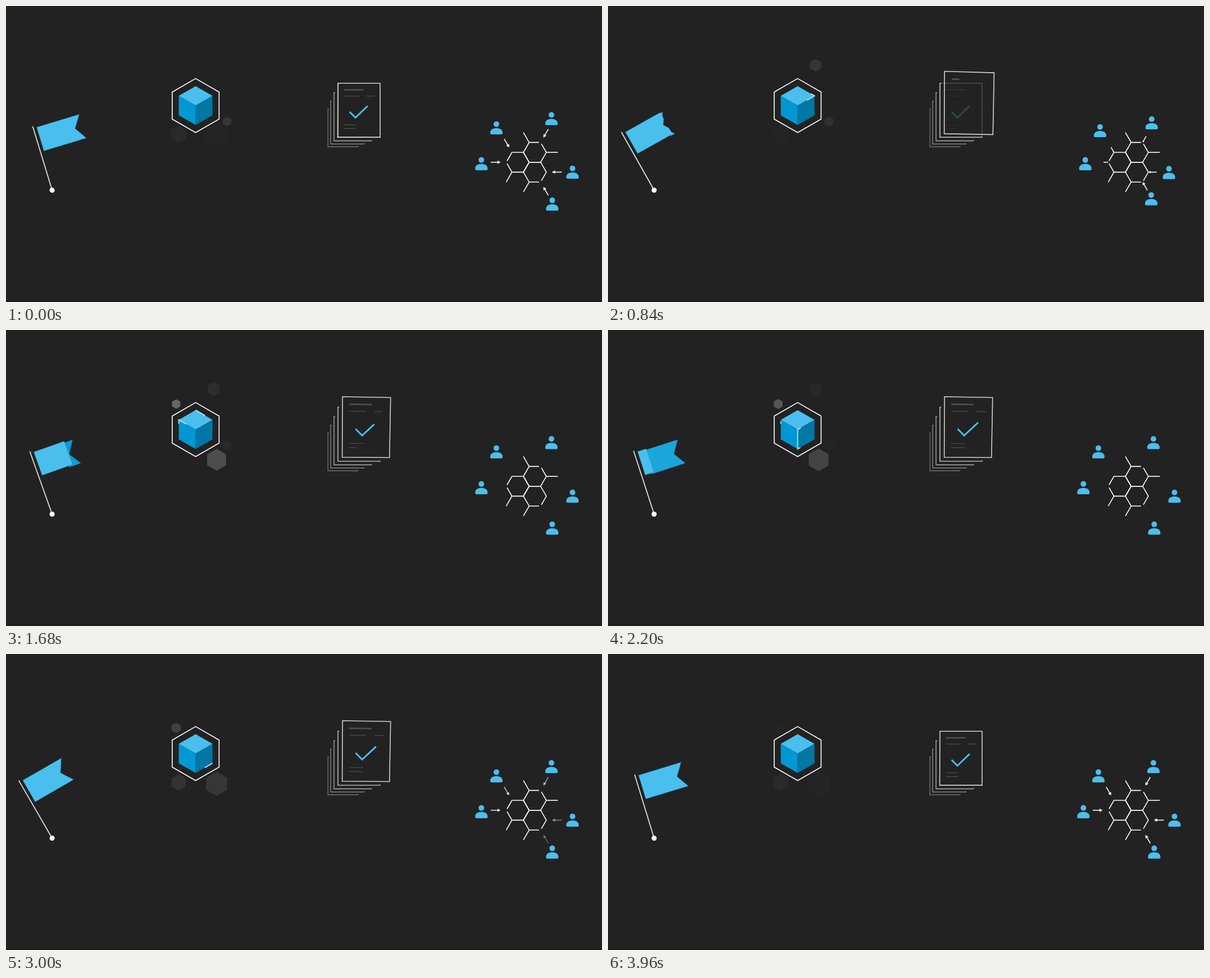
An HTML page with a canvas for the animation above (4 s loop, 1061x528 px).

```html
<!DOCTYPE html>
<html>
<head>
<meta charset="utf-8">
<style>
html, body { margin: 0; width: 100%; height: 100%; overflow: hidden; background: #222; }
canvas { display: block; }
</style>
</head>
<body>
<canvas id="stage" width="1061" height="528"></canvas>
<script>
const ctx = document.getElementById('stage').getContext('2d');
const LOOP = 4000, BLUE = '#4abfee', SIXTH = Math.PI / 3;

const clamp = x => Math.max(0, Math.min(1, x));
const ramp = (t, start, length) => clamp((t - start) / length);
const lerp = (a, b, k) => a + (b - a) * k;
const mix = (p, q, k) => p.map((v, i) => lerp(v, q[i], k));
const ease = k => (1 - Math.cos(Math.PI * k)) / 2;
const easeOut = k => 1 - (1 - k) ** 2;
const polar = ([x, y], r, angle) => [x + r * Math.cos(angle), y + r * Math.sin(angle)];

function trace(points, close) {
  ctx.beginPath();
  points.forEach(p => ctx.lineTo(...p));
  if (close) ctx.closePath();
}
function line(points, color, width, close) {
  trace(points, close);
  ctx.strokeStyle = color;
  ctx.lineWidth = width;
  ctx.stroke();
}
function fill(points, color) {
  trace(points, true);
  ctx.fillStyle = color;
  ctx.fill();
}
function disc(x, y, r, color) {
  ctx.beginPath();
  ctx.arc(x, y, r, 0, 7);
  ctx.fillStyle = color;
  ctx.fill();
}
const hexagon = (center, r) => [...Array(6).keys()].map(i => polar(center, r, (i - 1.5) * SIXTH));

// The stretch of a polyline between two distances counted in segments
function stretch(path, from, to) {
  const last = path.length - 1;
  const at = d => {
    const n = Math.min(last - 1, Math.floor(d));
    return mix(path[n], path[n + 1], d - n);
  };
  return [at(from), ...path.filter((p, n) => n > from && n < to), at(to)];
}

// Flag: swings on its base while a fold travels along the cloth
const CLOTH = [[6.3, -115.5], [85.5, -115.5], [71.2, -93.3], [85.5, -71.2], [6.3, -71.2]];

function clothPart(from, to, color) {
  ctx.save();
  ctx.beginPath();
  ctx.rect(from, -120, to - from, 60);
  ctx.clip();
  fill(CLOTH, color);
  line(CLOTH, 'rgba(0,100,150,.4)', 0.8, true);
  ctx.restore();
}
function drawFlag(t) {
  const p = t % 1000 / 1000, k = t < 1000 || t >= 2000 && t < 3000 ? p : 1 - p;
  const swing = 16.9 + 13.1 * (k - 0.13 * Math.sin(2 * Math.PI * k));
  const edge = 5 + 86 * p, lift = Math.sin(Math.PI * p);
  const shade = clamp(Math.min(p / 0.27, (0.88 - p) / 0.19));
  ctx.save();
  ctx.translate(82.1, 328.5);
  ctx.rotate(-swing * Math.PI / 180);
  line([[0, 0], [0, -118.8]], '#ddd', 1.8);
  disc(0, 0, 4.6, '#fff');
  ctx.save();
  ctx.translate(-8 * lift, 3 * lift);
  clothPart(edge, 100, `rgb(${mix([74, 191, 238], [8, 157, 213], shade)})`);
  ctx.restore();
  clothPart(0, edge, BLUE);
  ctx.restore();
}

// Cube with glints running along its edges, among swelling and fading hexagons
const CENTER = [337.6, 177.6];
const [TOP, RIGHT, LOW_RIGHT, BOTTOM, LOW_LEFT, LEFT] = hexagon(CENTER, 34.7);
const PUFFS = [ // x, y, radius, opacity, start
  [393.5, 206, 8.5, 0.1, 0], [369.5, 105.5, 11, 0.1, 450], [303, 132, 8.4, 0.34, 1450],
  [375, 231.5, 19.2, 0.21, 1500], [307.5, 229, 13.8, 0.1, 2400]
];

function drawGlint(path, reach, age) {
  const head = reach * ease(ramp(age, 0, 1150));
  const tail = reach * easeOut(ramp(age, 280, 2000));
  if (head > tail) line(stretch(path, tail, head), 'rgba(200,238,253,.85)', 2);
}
function drawCube(t) {
  for (const [x, y, r, opacity, start] of PUFFS) {
    const p = (t - start + LOOP) % LOOP / 2600;
    if (p < 1) fill(hexagon([x, y], r * (1 + 0.22 * p)), `rgba(255,255,255,${opacity * (1 - p)})`);
  }
  const frame = hexagon(CENTER, 48.2);
  fill(frame, '#222');
  line(frame, '#fff', 1.6, true);
  fill([TOP, RIGHT, CENTER, LEFT], BLUE);
  fill([LEFT, CENTER, BOTTOM, LOW_LEFT], '#0098d3');
  fill([CENTER, RIGHT, LOW_RIGHT, BOTTOM], '#0077a5');
  drawGlint([TOP, RIGHT, CENTER, LEFT, LOW_LEFT], 3.2, t - 300);
  drawGlint([TOP, RIGHT, CENTER, BOTTOM, LOW_RIGHT], 4, t - 1400);
}

// Documents: a stack in perspective, placed by depth
const pageBox = n => ({
  left: 599 - 8.6 * n + 0.53 * n * n,
  top: 119 + 19.6 * n - 0.88 * n * n,
  right: 683.7 - 18.9 * n + 1.15 * n * n,
  bottom: 227 + 7.5 * n - 0.37 * n * n
});
const ROWS = [ // from, to, height in page units, in drawing order
  [0.145, 0.61, 0.122], [0.145, 0.495, 0.237], [0.145, 0.435, 0.77],
  [0.67, 0.865, 0.237], [0.145, 0.435, 0.838]
];
const CHECK = [[0.279, 0.53], [0.416, 0.638], [0.705, 0.42]];

function drawPage(depth, bend, t) {
  const { left, top, right, bottom } = pageBox(depth), skew = 1 - depth;
  const tl = [left + 22 * bend, top - 7 * bend], bl = [left - 0.4, bottom];
  const tr = [right + skew + 11.5 * bend, top + 1.5 * skew - 4.4 * bend];
  const br = [right - skew - 2 * bend, bottom + 0.5 * skew];
  const at = ([u, v]) => {
    const [x, y] = mix(mix(tl, bl, v), mix(tr, br, v), u);
    return [x - 12 * bend * v * (1 - v), y];
  };
  const steps = [...Array(11).keys()].map(i => i / 10);
  line([...steps.map(v => at([1, v])), ...steps.map(v => at([0, 1 - v]))], '#d0d0d0', 1.6, true);
  ROWS.forEach(([from, to, v], i) => {
    const k = ramp(t, 640 + 180 * i, 600);
    line([at([from, v]), at([lerp(from, to, k), v])], '#505050', i ? 1.2 : 2.6);
  });
  const drawn = 2 * ramp(t, 1120, 600);
  if (drawn) line(stretch(CHECK.map(at), 0, drawn), BLUE, 3);
}
function drawSheetEdge(i, shift, bend) {
  const depth = i + shift, { left, top, right, bottom } = pageBox(depth);
  const sway = bend / 2 ** (i * i);
  const x = left + 22 * sway, y = top - 10 * sway;
  const tick = 2 + 12 * sway;
  ctx.globalAlpha = 0.95 * 0.82 ** depth * Math.min(1, 5 - depth);
  ctx.beginPath();
  ctx.moveTo(x + tick, y);
  ctx.lineTo(x, y);
  ctx.quadraticCurveTo((x + left) / 2 - 6 * sway, (y + bottom) / 2, left, bottom);
  ctx.lineTo(right, bottom);
  ctx.lineTo(right, bottom - 1.5);
  ctx.strokeStyle = '#fff';
  ctx.lineWidth = 1.5 - i * 0.1;
  ctx.stroke();
}
function drawDocuments(t) {
  const q = ramp(t, 3040, 640), shift = ease(q), bend = Math.sin(Math.PI * q);
  for (let i = 1; i < 5; i++) drawSheetEdge(i, shift, bend);
  ctx.globalAlpha = 1 - ramp(t, 360, 640);
  drawPage(1, 0, LOOP);
  // the next page drops in from near the viewer
  const near = (1 - ramp(t, 360, 700)) ** 3;
  ctx.save();
  ctx.globalAlpha = ramp(t, 360, 240);
  ctx.translate(599, 200);
  ctx.transform(1 + near, 0.4 * near, 0, 1 + near, 0, 0);
  ctx.translate(-599, -200);
  drawPage(shift, bend, t);
  ctx.restore();
  ctx.globalAlpha = 1;
}

// Network: three cells around a hub, with people joining in from outside
const HUB = [931.3, 278.7], CELL = 20.4;
const corner = (cell, turn, r = CELL) => polar(polar(HUB, CELL, cell * SIXTH), r, turn * SIXTH);
const PEOPLE = [ // head x, y, cell and corner to join, in sixths of a turn
  [846.3, 274.6, 3, 3], [873, 210.8, 3, 4], [971, 194.3, 5, 5],
  [1008.5, 289.8, 1, 0], [972.4, 346.6, 1, 1]
];

function drawNet() {
  for (const cell of [1, 3, 5]) {
    // each cell is open at its outer corner
    const ring = [0, 1, 2, 3, 4, 5, 6].map(i => corner(cell, cell + i));
    line(stretch(ring, 0.14, 5.86), '#fff', 1.6);
  }
  for (const [cell, turn] of [[5, 4], [5, 6], [3, 2], [1, 2]])
    line([corner(cell, turn), corner(cell, turn, 2 * CELL)], '#fff', 1.6);
}
function drawPerson(x, y) {
  disc(x, y, 5, BLUE);
  ctx.beginPath();
  ctx.moveTo(x - 11, y + 15);
  ctx.bezierCurveTo(x - 11, y + 9.5, x - 6, y + 7.2, x, y + 7.2);
  ctx.bezierCurveTo(x + 6, y + 7.2, x + 11, y + 9.5, x + 11, y + 15);
  ctx.arcTo(x + 11, y + 18.3, x + 8, y + 18.3, 2);
  ctx.arcTo(x - 11, y + 18.3, x - 11, y + 15, 2);
  ctx.fill();
}
function drawArrow([x, y], angle, moved) {
  const tail = -27.5 * (1 - moved), head = Math.min(0, tail + 17.5);
  const size = 1 - ramp(moved, 0.36, 0.4);
  ctx.save();
  ctx.translate(x, y);
  ctx.rotate(angle);
  line([[tail, 0], [head - 2 * size, 0]], '#fff', 1.6);
  fill([[head, 0], [head - 5.5 * size, -3 * size], [head - 5.5 * size, 3 * size]], '#fff');
  ctx.restore();
}
function drawNetwork(t) {
  drawNet();
  PEOPLE.forEach(([x, y, cell, turn], i) => {
    const start = 120 + 80 * i, goal = corner(cell, turn);
    const step = 11 * (ease(ramp(t, start, 360)) - ease(ramp(t, start + 360, 580)));
    drawPerson(...polar([x, y], step, Math.atan2(goal[1] - y - 4, goal[0] - x)));
    const moved = ramp(t, start, 1040);
    if (moved === 1) ctx.globalAlpha = ramp(t, 2320 + 115 * i, 800);
    drawArrow(goal, (turn + 3) * SIXTH, moved % 1);
    ctx.globalAlpha = 1;
  });
}

function frame(now) {
  const t = now % LOOP;
  ctx.fillStyle = '#222';
  ctx.fillRect(0, 0, 1061, 528);
  ctx.fillStyle = '#1f1f1f';
  ctx.fillRect(0, 523, 1061, 5);
  drawFlag(t);
  drawCube(t);
  drawDocuments(t);
  drawNetwork(t);
  requestAnimationFrame(frame);
}
requestAnimationFrame(frame);
</script>
</body>
</html>
```
